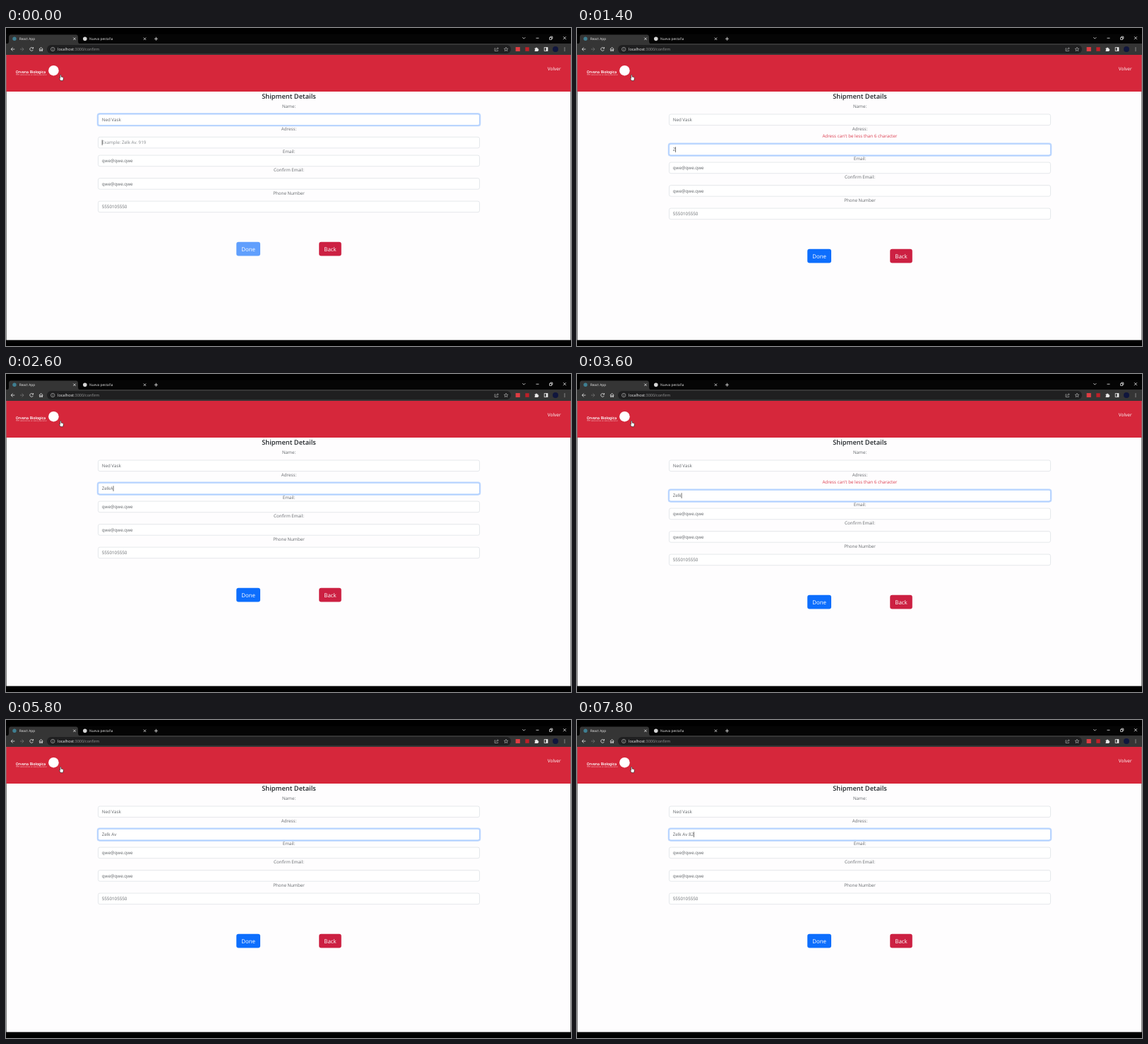
These frames come from a looping animation (800x450 px, 8000 ms). An HTML page:

```html
<!DOCTYPE html>
<html lang="en">
<head>
<meta charset="utf-8">
<title>Shipment form</title>
<style>
  html, body { margin: 0; width: 100%; height: 100%; overflow: hidden; background: #000; }
  svg { display: block; width: 100vw; height: 100vh; }
  text { font-family: "Open Sans", "Noto Sans", sans-serif; text-rendering: geometricPrecision; white-space: pre; }
  .line { fill: none; stroke: #e8e8e8; stroke-width: .8; }
  .tab { font-size: 4.8px; fill: #e8e8e8; }
  .label { font-size: 6.25px; fill: #666a6e; text-anchor: middle; }
  .value { font-size: 6.25px; fill: #62666a; }
  .button { font-size: 7.95px; fill: #fff; text-anchor: middle; }
  .box { fill: #fff; stroke: #d3d8de; stroke-width: .6; }
  .ring { fill: none; stroke: #0d6efd; stroke-opacity: .27; stroke-width: 1.7; }
  .focus .box { stroke: #86b7fe; }
  .field:not(.focus) .ring { display: none; }
</style>
</head>
<body>
<svg viewBox="0 0 800 450">
  <rect width="800" height="450"/>

  <!-- browser frame -->
  <rect y="8.5" width="800" height="14" fill="#050505"/>
  <path d="M2 22.5Q4 22 4 19V13Q4 9.5 7 9.5H99Q102 9.5 102 13V19Q102 22 104 22.5Z" fill="#353535"/>
  <rect y="22" width="800" height="16" fill="#353535"/>
  <rect x="58" y="24" width="657" height="12" rx="6" fill="#1f1f20"/>
  <circle cx="12" cy="15.3" r="2.7" fill="#3f7f92"/>
  <circle cx="111.8" cy="15.3" r="2.8" fill="#d5d5d5"/>
  <text class="tab" x="18.7" y="17.1">React App</text>
  <text class="tab" x="118" y="17.1">Nueva pestaña</text>
  <text x="73" y="32" font-size="5.5" fill="#f1f1f1">localhost<tspan fill="#9b9b9b">:3000/confirm</tspan></text>
  <g class="line">
    <path d="M95.3 13.6l3.4 3.4m0-3.4l-3.4 3.4M194.8 13.6l3.4 3.4m0-3.4l-3.4 3.4M210 15.3h5M212.5 12.8v5"/>
    <path d="M731.3 13.2l2 2 2-2M750.5 14.3h4M789 12.2l4 4m0-4l-4 4"/>
    <path d="M769.6 13.4h3v3h-3zM770.8 13.2v-1.1h3v3h-1.1"/>
    <path d="M12.3 30H7.2m2.4-2.5L7.1 30l2.5 2.5"/>
    <path d="M20 30h5m-2.4-2.5L25.1 30l-2.5 2.5" stroke="#777"/>
    <path d="M38.2 28.6a2.4 2.4 0 1 0 .2 2.2M38.6 27v2h-2"/>
    <path d="M46.8 30l2.8-2.5 2.8 2.5M47.7 29.5v3h1.2v-1.9h1.4v1.9h1.2v-3"/>
    <g stroke="#b5b5b5" stroke-width=".65">
      <path d="M66.2 29.6v2M66.2 28.2v.7"/><circle cx="66.2" cy="30" r="2.7"/>
      <path d="M693 28.7h-1v3.8h4.5v-1.2M693.5 31q.2-2.2 3.4-2.2m-1.2-1.5l1.5 1.5-1.5 1.5"/>
      <path d="M708 27.3l.8 1.8 2 .2-1.5 1.3.5 2-1.8-1.1-1.8 1.1.5-2-1.5-1.3 2-.2z"/>
    </g>
    <rect x="762.2" y="27.6" width="4.7" height="4.8"/>
  </g>
  <rect x="764.7" y="27.5" width="2.4" height="5" fill="#e8e8e8"/>
  <rect x="721.6" y="27" width="6.2" height="6" fill="#df3d43"/>
  <rect x="735.3" y="27.2" width="5.4" height="5.6" fill="#bd2028"/>
  <path d="M748.6 28.5h1.4a1 1 0 1 1 2 0h1.4v1.5a1 1 0 1 1 0 2v1h-4.8v-1.4a1 1 0 0 0 0-1.8z" fill="#e8e8e8"/>
  <circle cx="778" cy="30" r="4" fill="#10163d"/>
  <g fill="#e8e8e8">
    <circle cx="791" cy="28" r=".6"/><circle cx="791" cy="30" r=".6"/><circle cx="791" cy="32" r=".6"/>
  </g>

  <!-- page -->
  <rect x=".5" y="38" width="799" height="403.6" fill="#fefdfe"/>
  <rect x=".5" y="38" width="799" height="52" fill="#d6273b"/>
  <g fill="#fff">
    <text x="13.8" y="63.7" font-size="5" stroke="#fff" stroke-width=".15" style="font-family:'DejaVu Sans',sans-serif">Orvena Biologica</text>
    <text x="19.8" y="67" font-size="2.45" opacity=".85">Laboratorios en salud y bienestar</text>
    <rect x="14" y="65.6" width="5" height=".6" opacity=".8"/>
    <circle cx="67.4" cy="60.2" r="7.3"/>
    <text x="766.8" y="60.2" font-size="6.5">Volver</text>
  </g>
  <text x="400.5" y="100" font-size="9.3" font-weight="600" fill="#212529" text-anchor="middle">Shipment Details</text>
  <g id="upper"></g>
  <text id="error" class="label" x="400.4" y="155.1" style="fill:#dc3e50">Adress can't be less than 6 character</text>
  <g id="lower">
    <g id="done">
      <rect x="326.2" y="302.7" width="33.8" height="19.8" rx="3" fill="#0d6efd"/>
      <text class="button" x="343.1" y="315.6">Done</text>
    </g>
    <rect x="443.2" y="302.7" width="31.6" height="19.8" rx="3" fill="#cc2042"/>
    <text class="button" x="459" y="315.6">Back</text>
  </g>

  <path d="M76.6 66.6q.9-.8 1.5.2v2.3l2.3.5q1 .3.9 1.4l-.6 3.6h-3.3l-2-3q.1-1 1.2-.3z"
        fill="#fff" stroke="#111" stroke-width=".55"/>
</svg>

<script>
const LOOP = 8000, TICK = 200, BLINK = 530, ERROR_SHIFT = 10;
const PLACEHOLDER = "Example: Zelk Av. 919";

// [time of key press, address text]
const keys = [
  [0, ""], [1400, "Z"], [1600, "Ze"], [1800, "Zel"], [2000, "Zelk"],
  [2400, "ZelkA"], [2800, "ZelkAv"], [3400, "ZelkA"], [3600, "Zelk"],
  [4000, "Zelk "], [4600, "Zelk A"], [4800, "Zelk Av"],
  [6600, "Zelk Av "], [7200, "Zelk Av 8"], [7600, "Zelk Av 82"]
];

const $ = id => document.getElementById(id);

function svg(parent, tag, attrs, text = "") {
  const node = document.createElementNS("http://www.w3.org/2000/svg", tag);
  for (const key in attrs) node.setAttribute(key, attrs[key]);
  node.textContent = text;
  return parent.appendChild(node);
}

function label(parent, y, text) {
  svg(parent, "text", { class: "label", x: 400.5, y }, text);
}

function field(parent, y, text) {
  const group = svg(parent, "g", { class: "field" });
  svg(group, "rect", { class: "ring", x: 129.6, y: y - .9, width: 541.8, height: 17.4, rx: 3 });
  svg(group, "rect", { class: "box", x: 130.5, y, width: 540, height: 15.6, rx: 2.4 });
  const value = svg(group, "text", { class: "value", x: 135.7, y: y + 10.1 }, text);
  return { group, value };
}

const upper = $("upper"), lower = $("lower");
label(upper, 112.6, "Name:");
const name = field(upper, 122, "Ned Vask");
label(upper, 145, "Adress:");
const address = field(lower, 154.3, "");
const caret = svg(address.group, "rect", { y: 158.3, width: .65, height: 7.6, fill: "#222" });
label(lower, 177.3, "Email:");
field(lower, 180.1, "qwe@qwe.qwe");
label(lower, 203.2, "Confirm Email:");
field(lower, 212.6, "qwe@qwe.qwe");
label(lower, 235.6, "Phone Number");
field(lower, 245.1, "5550105550");

function draw(time) {
  const t = Math.floor(time % LOOP / TICK) * TICK;
  const [pressed, text] = keys.findLast(([at]) => at <= t);
  const invalid = text.length > 0 && text.length < 5;

  name.group.classList.toggle("focus", t < TICK);
  address.group.classList.toggle("focus", t >= TICK);
  address.value.textContent = text || PLACEHOLDER;
  address.value.style.fill = text ? "" : "#85898d";
  caret.setAttribute("x", 135.8 + (text ? address.value.getComputedTextLength() : 0));
  caret.style.opacity = Math.floor((t - pressed) / BLINK) % 2 ? 0 : 1;

  $("error").style.display = invalid ? "" : "none";
  lower.setAttribute("transform", `translate(0 ${invalid ? ERROR_SHIFT : 0})`);
  $("done").style.opacity = text ? 1 : .65;
}

const start = performance.now();
function loop(now) {
  draw(Math.max(0, now - start));
  requestAnimationFrame(loop);
}
draw(0);
requestAnimationFrame(loop);
</script>
</body>
</html>
```
